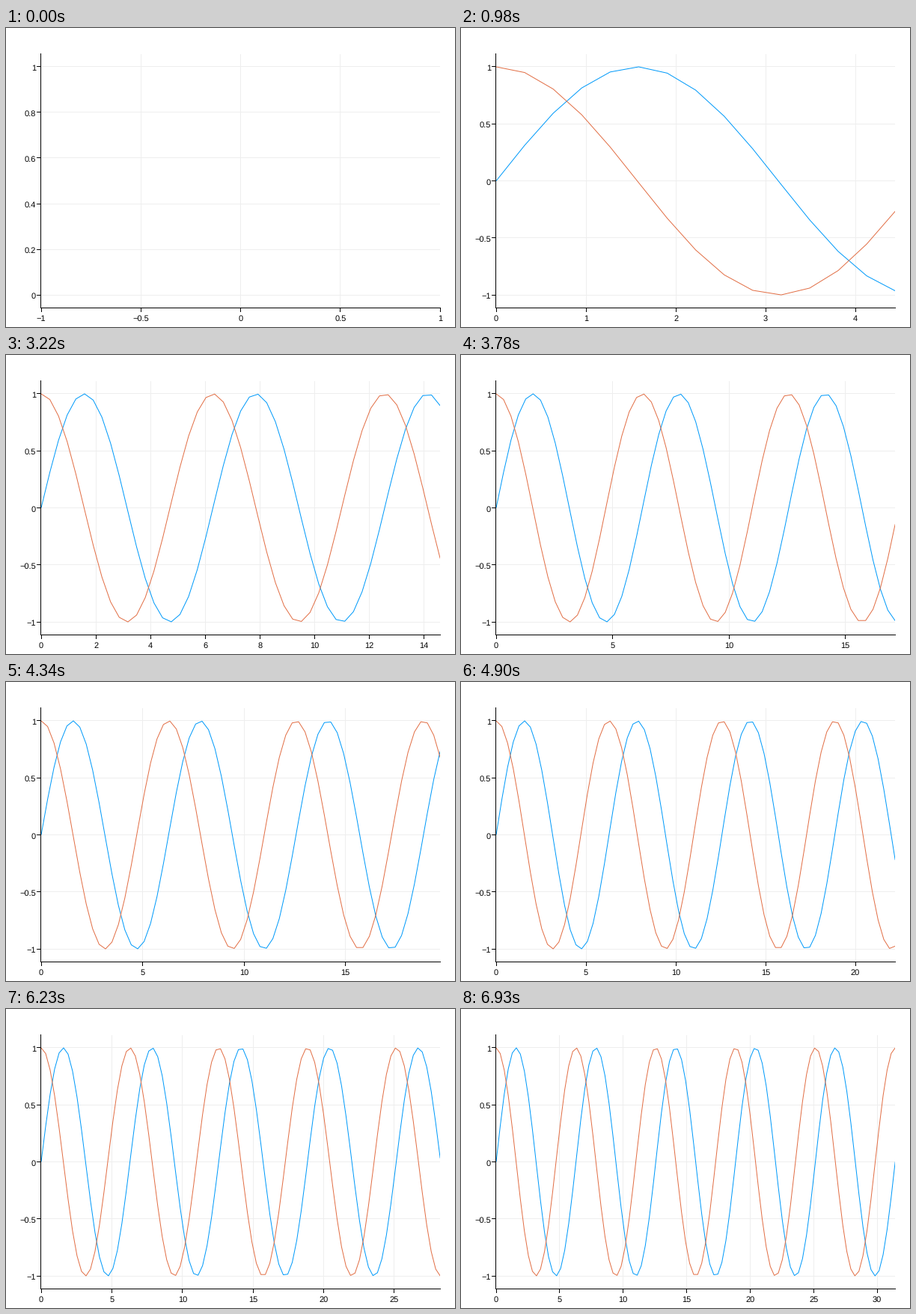
Animation, 600 px wide and 400 px high, one loop 7 s. Source, as a matplotlib script:

```python
import math

import matplotlib.pyplot as plt
import numpy as np
from matplotlib.animation import FuncAnimation
from matplotlib.patches import Rectangle

W, H, DPI = 600, 400, 100
PX = 72 / DPI  # one pixel in points
LEFT, RIGHT, TOP, BOTTOM = 47.0, 580.2, 35.0, 374.0
STEPS, INTERVAL = 100, 70
BLUE, ORANGE = "#009afa", "#e26f46"
GRID, INK = "#eeeeee", "#000000"

plt.rcParams["font.family"] = "Liberation Sans"
plt.rcParams["text.hinting"] = "none"
plt.rcParams["path.simplify"] = False

xs = np.linspace(0, 10 * np.pi, STEPS)
curves = ((np.sin(xs), BLUE), (np.cos(xs), ORANGE))

fig = plt.figure(figsize=(W / DPI, H / DPI), dpi=DPI, facecolor="white")
ax = fig.add_axes((0, 0, 1, 1))


def tick_values(lo, hi, length, min_gap):
    """Multiples of a 2-5-10 step that fall inside the range."""
    count = min(max(length / min_gap, 4), 9) + 1
    rough = (hi - lo) / count
    base = 10 ** math.floor(math.log10(rough))
    step = base * next((m for m in (2, 5, 10) if m * base >= rough), 10)
    first = math.ceil(lo / step - 1e-6)
    last = math.floor(hi / step + 1e-6)
    return [k * step for k in range(first, last + 1)]


def label(value):
    return f"{round(value, 6) + 0:g}".replace("-", "\u2212")


def stroke(x, y, color, z, snap=False):
    return ax.plot(x, y, color=color, lw=PX, zorder=z, snap=snap,
                   solid_capstyle="butt", solid_joinstyle="miter")[0]


def write(x, y, text, align):
    ax.text(x, y, text, size=11 * PX, color=INK, ha=align, va="baseline", zorder=5)


def crisp(p):
    return math.floor(p + 0.5) + 0.5


def draw(i):
    ax.clear()
    ax.set(xlim=(0, W), ylim=(H, 0))
    ax.axis("off")

    n = i + 1
    x_lo, x_hi = (0, xs[i]) if i else (-1, 1)
    y_lo = min(y[:n].min() for y, _ in curves)
    y_hi = max(y[:n].max() for y, _ in curves)
    pad = (y_hi - y_lo) / 18
    y_lo, y_hi = y_lo - pad, y_hi + pad

    def to_x(v):
        return LEFT + (v - x_lo) / (x_hi - x_lo) * (RIGHT - LEFT)

    def to_y(v):
        return BOTTOM - (v - y_lo) / (y_hi - y_lo) * (BOTTOM - TOP)

    for v in tick_values(x_lo, x_hi, RIGHT - LEFT, 80):
        p = to_x(v)
        c = crisp(p - 0.5)
        if LEFT + 1 < p < RIGHT - 1:
            stroke([c, c], [TOP, BOTTOM], GRID, 1)
        stroke([c, c], [375, 380], INK, 4)
        write(p, 392, label(v), "center")

    for v in tick_values(y_lo, y_hi, BOTTOM - TOP, 40):
        p = to_y(v)
        c = crisp(p - 0.5)
        if TOP + 1 < p < BOTTOM - 1:
            stroke([LEFT, 580], [c, c], GRID, 1)
        stroke([41, 46], [c, c], INK, 4)
        write(40, round(p) + 5, label(v), "right")

    if i:
        area = Rectangle((LEFT, TOP), RIGHT - LEFT, BOTTOM - TOP,
                         transform=ax.transData)
        for y, color in curves:
            stroke(to_x(xs[:n]), to_y(y[:n]), color, 3).set_clip_path(area)

    stroke([46.5, 46.5], [34, 375], INK, 4)
    stroke([46, 581], [374.5, 374.5], INK, 4)


anim = FuncAnimation(fig, draw, frames=STEPS, interval=INTERVAL, repeat=True)
plt.show()
```
